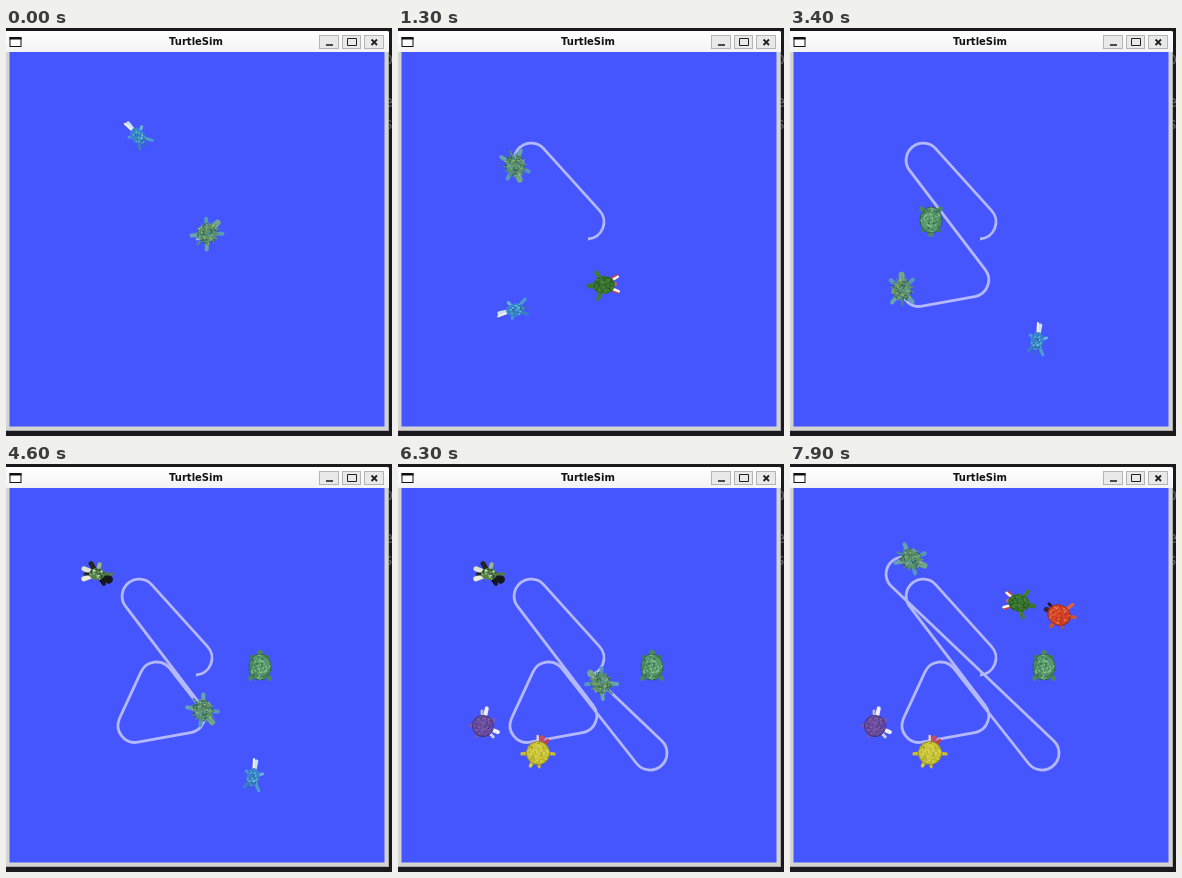
Animation, 386 px wide and 408 px high, one loop 8000 ms. Source, as an HTML page:

```html
<!DOCTYPE html>
<html lang="en">
<head>
<meta charset="utf-8">
<title>TurtleSim</title>
<style>
html, body { margin: 0; width: 100%; height: 100%; overflow: hidden; background: #1b191d; }
svg { display: block; width: 386px; height: 408px; }
.title { font: bold 10px "DejaVu Sans", sans-serif; text-anchor: middle; fill: #111; }
.term { font: 15px "DejaVu Sans Mono", monospace; fill: #66656a; }
.button rect { fill: #e9e9e9; stroke: #b4b4b4; }
.button path { fill: none; stroke: #222; }
#trail { fill: none; stroke: #b3b8ff; stroke-width: 2.8; stroke-linejoin: round; }
</style>
</head>
<body>
<svg viewBox="0 0 386 408">
  <defs>
    <linearGradient id="bar" x2="0" y2="1">
      <stop offset="0" stop-color="#fff"/><stop offset="1" stop-color="#f3f3f3"/>
    </linearGradient>
  </defs>
  <rect width="386" height="408" fill="#1b191d"/>
  <g class="term">
    <text x="378" y="36">p</text><text x="378" y="79">e</text><text x="378" y="101">s</text>
    <text id="log" x="1" y="413" fill="#88878c">theta=[4.111549]</text>
  </g>
  <path d="M0 3H381Q383 3 383 5V403H0Z" fill="#d4d4d2"/>
  <path d="M0 3H381Q383 3 383 5V24H0Z" fill="url(#bar)"/>
  <path d="M0 402.5H383M382.5 24V403" stroke="#aaa" fill="none"/>
  <rect x="4" y="9.5" width="11" height="9" fill="#fff" stroke="#111"/>
  <path d="M3.5 10.5H15.5" stroke="#111" stroke-width="2"/>
  <text class="title" x="190" y="17">TurtleSim</text>
  <g class="button">
    <rect x="313.5" y="7.5" width="19" height="13"/><path d="M320 17H327" stroke-width="1.6"/>
    <rect x="336.5" y="7.5" width="18" height="13"/><path d="M341.5 10.5H350.5V17.5H341.5Z"/>
    <rect x="358.5" y="7.5" width="19" height="13"/><path d="M365.5 11.5L371 17M371 11.5L365.5 17" stroke-width="1.8"/>
  </g>
  <rect x="3.5" y="24" width="375" height="374.5" fill="#4556ff"/>
  <path id="trail" d="M190 211A17 17 0 0 0 201.4 182.4L145.4 120.4A17 17 0 0 0 119.4 142.2
    L195.2 241.6A17 17 0 0 1 184.7 268.7L131.9 278.2A17 17 0 0 1 113.4 254.7
    L134.9 208.2A17 17 0 0 1 163.8 204.5L238.6 299.5A17 17 0 1 0 263.7 276.7
    L101.3 122.3A17 17 0 0 1 121 95"/>
  <g id="turtles"></g>
</svg>
<script>
const LOOP = 8000, STEP = 100;
const trail = document.getElementById('trail');
const layer = document.getElementById('turtles');
const log = document.getElementById('log');
const total = trail.getTotalLength();

// Head points along +x. limbs: [angle, reach, width, colour]
const kinds = {
  leaf: { rx: 12, ry: 11, spikes: 14, shell: '#5c9168', specks: ['#94ad6c', '#35694f', '#a9b57c', '#569cac', '#2f5b58'],
    limbs: [[0, 15, 6, '#72a68c'], [48, 15, 4, '#5799bd'], [-48, 15, 4, '#5799bd'],
            [140, 16, 4, '#66a3b0'], [-140, 16, 4, '#66a3b0'], [180, 15, 2, '#4d8b80']] },
  blue: { rx: 9, ry: 6.5, shell: '#3985cd', specks: ['#62bcd8', '#2865ad', '#7ccbd4', '#3b78a6'],
    limbs: [[0, 16, 4, '#c9e1ef'], [-9, 18, 2, '#f4f4ee'], [60, 10, 3, '#68b3dc'], [-60, 9, 3, '#4c96d6'],
            [145, 15, 3, '#4aa0c8'], [-150, 13, 3, '#3a7fc0'], [180, 13, 2, '#2f6db4']] },
  forest: { rx: 11, ry: 9, shell: '#2f6b2c', specks: ['#468438', '#24521f', '#5b8a3d'],
    limbs: [[0, 15, 5, '#3c7432'], [63, 15, 4, '#477b35'], [-63, 15, 4, '#477b35'],
            [150, 15, 4, '#d8402c'], [-150, 15, 4, '#d8402c'], [180, 11, 4, '#e56a2c'],
            [153, 16, 2.5, '#fff'], [-153, 16, 2.5, '#fff']] },
  moss: { rx: 13, ry: 11, shell: '#569a6b', specks: ['#83bf8a', '#35694a', '#95c49a', '#477e5b'], edge: '#315f45',
    limbs: [[0, 14, 6, '#4d8a5e'], [38, 13, 4, '#437b55'], [-38, 13, 4, '#437b55'],
            [140, 15, 4.5, '#4a8660'], [-140, 15, 4.5, '#4a8660']] },
  patchy: { rx: 8, ry: 6, shell: '#52824a', specks: ['#8fae72', '#1b211c', '#e8ecd8', '#324f35'],
    limbs: [[25, 13, 8, '#15171a'], [55, 12, 4, '#15171a'], [0, 15, 3, '#56784c'], [160, 14, 5, '#e9ead9'],
            [202, 14, 5, '#dfe4d0'], [180, 12, 3, '#24291f'], [-120, 12, 5, '#202722'], [-75, 10, 4, '#9db68b']] },
  purple: { rx: 10.5, ry: 10.5, shell: '#66499f', specks: ['#8262a8', '#4c3682', '#74569f'], edge: '#4a3777',
    limbs: [[0, 12, 4, '#7a5cb4'], [50, 16, 4, '#eeeef6'], [-50, 18, 4, '#eeeef6'], [-66, 15, 3, '#b6b8dc'],
            [75, 15, 3, '#cfd0ea'], [150, 13, 3, '#765aa5'], [-150, 13, 3, '#765aa5']] },
  yellow: { rx: 11.5, ry: 11.5, shell: '#c9c532', specks: ['#e2da52', '#9c9928', '#d8cf6a', '#b0a832'], edge: '#8e8a2f',
    limbs: [[0, 15, 6, '#b8506c'], [22, 16, 3, '#d23c3c'], [-16, 17, 2.5, '#e7c6cf'],
            [78, 16, 3.5, '#c5b93a'], [-108, 16, 3.5, '#c5b93a'], [-165, 15, 3.5, '#d0c63c'], [160, 14, 3, '#c5b93a']] },
  red: { rx: 11.5, ry: 10, shell: '#d94426', specks: ['#f0683c', '#a8321f', '#e88a58', '#c23a2a'], edge: '#96301f',
    limbs: [[0, 14, 5, '#35233c'], [24, 15, 3, '#1d1b27'], [-79, 14, 3.5, '#d4532f'],
            [119, 17, 3.5, '#e0603a'], [165, 16, 3.5, '#d4532f'], [-130, 13, 3, '#c84a2a']] }
};

// kind, x, y, heading, appears, disappears
const visitors = [
  ['blue', 132, 108, -128, 0, 900],
  ['forest', 206, 257, 176, 400, 2300],
  ['blue', 117, 282, 168, 1200, 3100],
  ['moss', 141, 192, 90, 2000, 3900],
  ['blue', 247, 313, -78, 2800, 5200],
  ['patchy', 91, 110, 0, 3600, 7500],
  ['moss', 254, 203, -90, 4400, LOOP],
  ['yellow', 140, 289, -75, 5200, LOOP],
  ['purple', 85, 262, -28, 6000, LOOP],
  ['forest', 229, 139, 12, 6800, LOOP],
  ['red', 269, 151, 204, 7600, LOOP]
];

// time, distance along the trail
const pace = [[0, 13], [1300, 168], [2200, 288], [3400, 416], [4600, 563], [6300, 770], [7900, total]];

function random(seed) {
  return () => (seed = seed * 16807 % 2147483647) / 2147483647;
}

function polar(angle, r, ry = r) {
  return [(Math.cos(angle) * r).toFixed(1), (Math.sin(angle) * ry).toFixed(1)];
}

function shellShape({ rx, ry, spikes, shell, edge }) {
  if (!spikes) return `<ellipse rx="${rx}" ry="${ry}" fill="${shell}" stroke="${edge || 'none'}"/>`;
  const points = Array.from({ length: spikes * 2 }, (_, i) => {
    const k = i % 2 ? 0.72 : 1.12;
    return polar(i * Math.PI / spikes, rx * k, ry * k);
  });
  return `<polygon points="${points.join(' ')}" fill="${shell}"/>`;
}

function draw(name) {
  const kind = kinds[name], rnd = random(name.length * 977 + 31);
  let out = '';
  for (const [deg, reach, width, colour] of kind.limbs) {
    const [x, y] = polar(deg * Math.PI / 180, reach);
    out += `<path d="M0 0L${x} ${y}" stroke="${colour}" stroke-width="${width}" stroke-linecap="round"/>`;
  }
  out += shellShape(kind);
  for (let i = 0; i < kind.rx * kind.ry * 0.6; i++) {
    const r = Math.sqrt(rnd()) * 0.92;
    const [x, y] = polar(rnd() * Math.PI * 2, kind.rx * r, kind.ry * r);
    const colour = kind.specks[Math.floor(rnd() * kind.specks.length)];
    out += `<rect x="${x - 0.7}" y="${y - 0.7}" width="1.5" height="1.5" fill="${colour}"/>`;
  }
  return out;
}

function add(name) {
  const g = document.createElementNS('http://www.w3.org/2000/svg', 'g');
  g.innerHTML = draw(name);
  layer.append(g);
  return g;
}

function place(g, x, y, heading) {
  g.setAttribute('transform', `translate(${x} ${y}) rotate(${heading})`);
}

function show(el, on) {
  el.style.visibility = on ? 'visible' : 'hidden';
}

function travelled(t) {
  const i = Math.max(1, pace.findIndex(p => p[0] >= t));
  const [t0, d0] = pace[i - 1], [t1, d1] = pace[i];
  return d0 + (d1 - d0) * (t - t0) / (t1 - t0);
}

const hunter = add('leaf');
const guests = visitors.map(([name, x, y, heading]) => {
  const g = add(name);
  place(g, x, y, heading);
  return g;
});

function frame(now) {
  const t = Math.floor(now % LOOP / STEP) * STEP;
  const d = travelled(t);
  const p = trail.getPointAtLength(d);
  const a = trail.getPointAtLength(d - 1), b = trail.getPointAtLength(d + 1);
  place(hunter, p.x, p.y, Math.atan2(b.y - a.y, b.x - a.x) * 180 / Math.PI);
  trail.style.strokeDasharray = `${d} 2000`;
  visitors.forEach(([, , , , from, to], i) => show(guests[i], t >= from && t < to));
  show(log, t >= 2000 && t < 2400);
  requestAnimationFrame(frame);
}
frame(performance.now());
</script>
</body>
</html>
```
